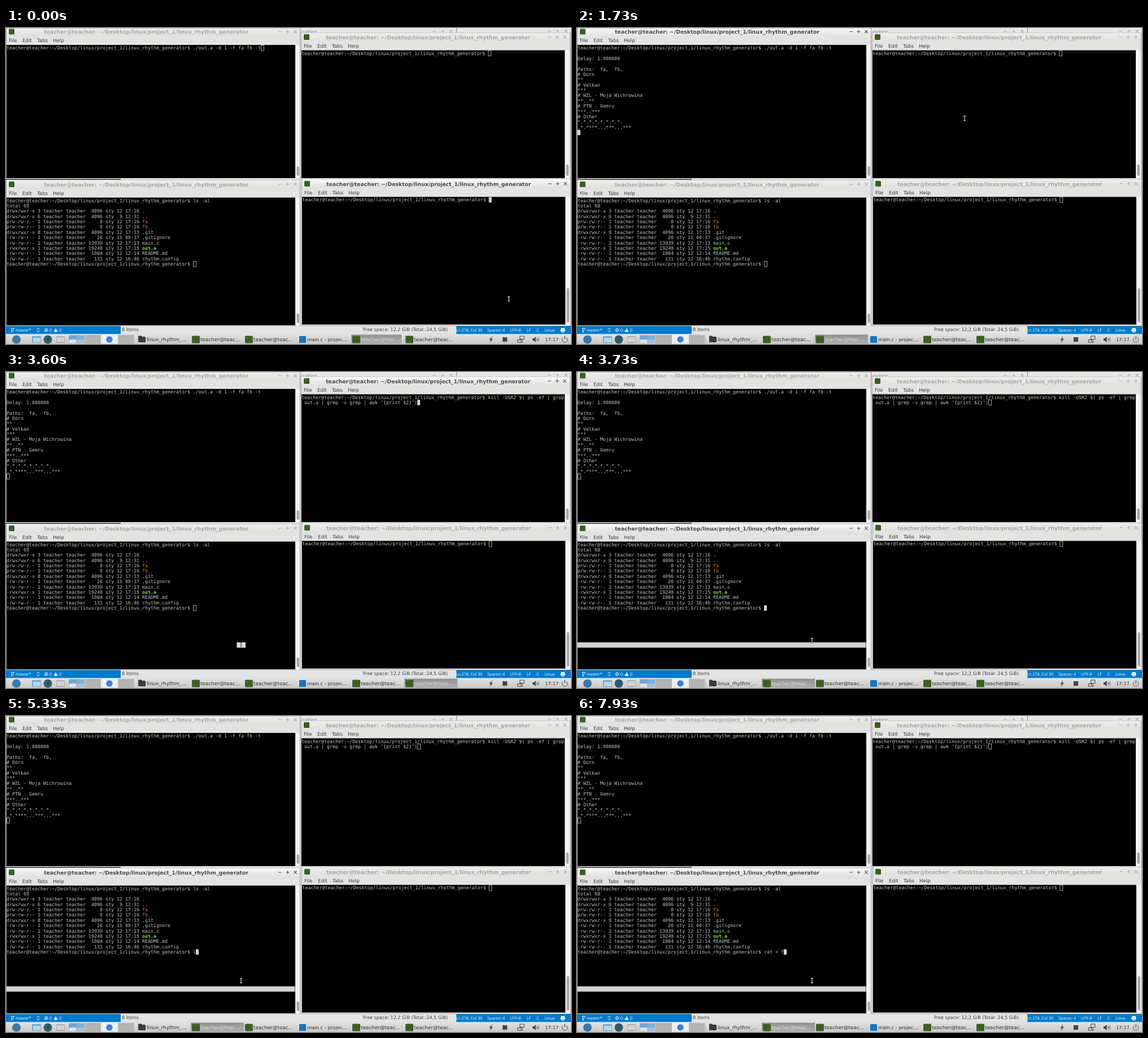
Animation of 1000x560 px, one loop 8000 ms. Source, as an HTML page with a canvas:

```html
<!DOCTYPE html>
<html lang="en">
<head>
<meta charset="utf-8">
<title>Four terminals</title>
<style>
html, body { margin: 0; width: 100%; height: 100%; overflow: hidden; background: #dededd; }
canvas { display: block; }
</style>
</head>
<body>
<canvas id="stage" width="1000" height="560"></canvas>
<script>
const ctx = document.getElementById('stage').getContext('2d');
const LOOP = 8000, STEP = 1000 / 15;
const CW = 5, LH = 9.375;
const SANS = '"DejaVu Sans", sans-serif';
const MONO = '8.33px "DejaVu Sans Mono", monospace';
const UI = '8.6px ' + SANS;
const TASK = '8.8px ' + SANS;
const BOLD = 'bold 9.375px ' + SANS;
const STATUS = '7.2px "Open Sans", sans-serif';
const FG = '#c4c4c4', GREEN = '#3c5f25', BLUE = '#007acc';

const USER = 'teacher';
const DIR = '~/Desktop/linux/project_1/linux_rhythm_generator';
const PROMPT = `${USER}@${USER}:${DIR}$ `;
const TITLE = `${USER}@${USER}: ${DIR}`;
const RUN = PROMPT + './out.a -d 1 -f fa fb -t';
const OUTPUT = ['', 'Delay: 1.000000', '', 'Paths:  fa,  fb,', '# Dorn', '**', '# Velkan', '***',
  '# WZL - Moja Wichrowina', '**..**', '# PTN - Gemru', '***..***', '# Other',
  '*.*.*.*.*.*.*.*.', '.*.****...***...***'];
const KILL = ['kill -USR2 $( ps -ef | grep', " out.a | grep -v grep | awk '{print $2}')"];

const FILES = [
  ['drwxrwxr-x 3', 4096, '12 17:16', '.', '#a9bfdc'],
  ['drwxrwxr-x 6', 4096, ' 9 12:31', '..', '#a9bfdc'],
  ['prw-rw-r-- 1', 0, '12 17:16', 'fa', '#bd8a18'],
  ['prw-rw-r-- 1', 0, '12 17:16', 'fb', '#bd7a20'],
  ['drwxrwxr-x 8', 4096, '12 17:13', '.git', '#a9bfdc'],
  ['-rw-rw-r-- 1', 26, '11 00:37', '.gitignore'],
  ['-rw-rw-r-- 1', 13939, '12 17:13', 'main.c'],
  ['-rwxrwxr-x 1', 19248, '12 17:15', 'out.a', '#8fe03c'],
  ['-rw-rw-r-- 1', 1004, '12 12:14', 'README.md'],
  ['-rw-rw-r-- 1', 131, '12 16:46', 'rhythm.config']
];

// x, y: frame corner; tx, ty: first text cell; ends of the black area; scrollbar thumb
const WINDOWS = {
  tl: { x: 0, y: 0, r: 521, b: 267, title: 6.5, bx: 485, tx: 1, ty: 30.5, br: 512, bb: 266, thumb: [245, 262], task: 422 },
  tr: { x: 522, y: 8, r: 999, b: 267, title: 16, bx: 962, tx: 523, ty: 40, br: 989, bb: 266, thumb: [242, 262], task: 706 },
  bl: { x: 0, y: 269, r: 521, b: 528, title: 277, bx: 485, tx: 1, ty: 301, br: 512, bb: 527, thumb: [506, 523], task: 328 },
  br: { x: 523, y: 267, r: 1000, b: 527, title: 276, bx: 963, tx: 524.5, ty: 299.8, br: 990, bb: 525.5, thumb: [461, 522], task: 612 }
};

const MOUSE = [[0, 890, 480], [200, 455, 168], [1467, 455, 168], [1733, 686, 160], [1867, 692, 153],
  [2733, 692, 153], [2867, 712, 151], [3333, 712, 151], [3533, 416, 484], [3667, 416, 484], [3800, 416, 469]];

// [time, value] lists: the last entry already reached holds
const FOCUS = [[0, 'br'], [195, 'tl'], [1930, 'tr'], [3730, 'bl']];
const TR_INPUT = [[0, ['']], [2265, ['clear']], [3130, KILL]];
const LS = 'ls -al', CAT = 'cat < f';
const BL_INPUT = [[0, ''], [4130, LS]]
  .concat([5000, 5067, 5133, 5200, 5267, 5400].map((t, i) => [t, LS.slice(0, 5 - i)]))
  .concat([6730, 6865, 7000, 7200, 7400, 7865, 7930].map((t, i) => [t, CAT.slice(0, i + 1)]));

const at = (list, t) => list.filter(e => e[0] <= t).pop()[1];

function rect(x, y, w, h, color) {
  ctx.fillStyle = color;
  ctx.fillRect(x, y, w, h);
}

function shade(x, y, w, h, top, bottom) {
  const g = ctx.createLinearGradient(0, y, 0, y + h);
  g.addColorStop(0, top);
  g.addColorStop(1, bottom);
  rect(x, y, w, h, g);
}

function disc(x, y, r, color) {
  ctx.fillStyle = color;
  ctx.beginPath();
  ctx.arc(x, y, r, 0, 7);
  ctx.fill();
}

function round(x, y, w, h, r, color) {
  ctx.fillStyle = color;
  ctx.beginPath();
  ctx.roundRect(x, y, w, h, r);
  ctx.fill();
}

function line(color, width, ...paths) {
  ctx.strokeStyle = color;
  ctx.lineWidth = width;
  ctx.beginPath();
  for (const p of paths)
    for (let i = 0; i < p.length; i += 2) ctx[i ? 'lineTo' : 'moveTo'](p[i], p[i + 1]);
  ctx.stroke();
}

function ring(x, y, r, color, from = 0, to = 7) {
  ctx.strokeStyle = color;
  ctx.lineWidth = 0.9;
  ctx.beginPath();
  ctx.arc(x, y, r, from, to);
  ctx.stroke();
}

function text(s, x, y, font, color, align = 'left') {
  ctx.font = font;
  ctx.fillStyle = color;
  ctx.textAlign = align;
  ctx.fillText(s, x, y);
}

function cells(w, row, s, col = 0, color = FG, weight = '') {
  ctx.font = weight + MONO;
  ctx.fillStyle = color;
  ctx.textAlign = 'left';
  [...s].forEach((c, i) => {
    if (c !== ' ') ctx.fillText(c, w.tx + (col + i) * CW, w.ty + row * LH + 7.5);
  });
}

function caret(w, row, col, solid) {
  const x = w.tx + col * CW, y = w.ty + row * LH;
  if (solid) return rect(x, y, CW, LH, '#d6d6d6');
  ctx.strokeStyle = '#c8c8c8';
  ctx.lineWidth = 0.8;
  ctx.strokeRect(x + 0.4, y + 0.1, CW, LH);
}

function buttons(x, y, color, gap = 13.5) {
  const c = x + 2 * gap;
  line(color, 1.2, [x - 3, y, x + 3, y], [x + gap - 3, y, x + gap + 3, y], [x + gap, y - 3, x + gap, y + 3],
    [c - 2.6, y - 2.6, c + 2.6, y + 2.6], [c + 2.6, y - 2.6, c - 2.6, y + 2.6]);
}

function frame(w, active) {
  const top = w.ty - 0.5, ink = active ? '#4b4b4b' : '#aaaaa8';
  rect(w.x, w.y, w.r - w.x, w.b - w.y, '#e3e3e2');
  shade(w.x, w.y, w.r - w.x, 15, active ? '#fafafa' : '#eeeeed', active ? '#e2e2e1' : '#e0e0df');
  rect(w.x, w.y, 0.8, w.b - w.y, '#9a9a9a');
  rect(w.x, w.y, w.r - w.x, 0.6, '#b5b5b5');
  round(w.x + 5, w.title - 5, 10, 10, 1.5, GREEN);
  text(TITLE, w.x + (w.x === 523 ? 225 : w.x ? 225 : 248), w.title + 3.5, BOLD, ink, 'center');
  buttons(w.bx, w.title, ink);
  ['File', 'Edit', 'Tabs', 'Help'].forEach((s, i) =>
    text(s, w.x + 5 + [0, 24, 50, 78][i], w.title + 18.8, UI, '#3a3a3a'));
  rect(w.x + 1, top, w.br - w.x - 1, w.bb - top, '#000');
  rect(w.br, top, w.r - w.br - 1, w.bb - top, '#f3f3f3');
  round(w.br + 2.3, w.thumb[0], 4.6, w.thumb[1] - w.thumb[0], 2.3, '#a9a9ac');
  rect(w.r - 1, w.y, 0.8, w.b - w.y, '#8c8c8c');
}

function backdrop() {
  rect(0, 0, 1000, 560, '#dededd');
  ctx.save();
  ctx.beginPath();
  ctx.rect(522, 0, 478, 8);
  ctx.clip();
  shade(522, 0, 478, 9, '#ececeb', '#e2e2e1');
  text('linux_rhythm_generator', 550, 9.5, BOLD, '#b0b0ae', 'right');
  buttons(758, 6, '#b0b0ae', 15);
  buttons(962, 5.5, '#b0b0ae', 14.5);
  rect(797, 0, 1, 8, '#8a8a8a');
  ctx.restore();
}

function statusBar() {
  rect(0, 528, 1000, 15, BLUE);
  rect(203, 527.5, 594, 15, '#e4e4e3');
  rect(203, 527.5, 594, 0.7, '#a8a8a8');
  text('8 items', 205, 537, '8.02px ' + SANS, '#3c3c3c');
  text('Free space: 12,2 GiB (Total: 24,5 GiB)', 632, 537, '8.02px ' + SANS, '#3c3c3c');
  const W = '#fff';
  line(W, 0.8, [10.5, 533, 10.5, 538], [13.5, 533.5, 13.5, 535, 10.5, 537]);
  for (const [x, y] of [[10.5, 532.5], [13.5, 532.5], [10.5, 538.5]]) disc(x, y, 1.1, W);
  text('master*', 17, 538, STATUS, W);
  ring(57, 535.5, 2.8, W, 0.3, 2.8);
  ring(57, 535.5, 2.8, W, 3.5, 5.9);
  ring(71, 535.5, 2.8, W);
  line(W, 0.8, [69.8, 534.3, 72.2, 536.7], [72.2, 534.3, 69.8, 536.7]);
  text('0', 77, 538, STATUS, W);
  ctx.fillStyle = W;
  ctx.beginPath();
  ctx.moveTo(88, 532);
  ctx.lineTo(91.5, 538.5);
  ctx.lineTo(84.5, 538.5);
  ctx.fill();
  rect(87.6, 534, 0.8, 2.4, BLUE);
  text('0', 94, 538, STATUS, W);
  ctx.save();
  ctx.beginPath();
  ctx.rect(797, 528, 203, 15);
  ctx.clip();
  text('Ln 278, Col 30', 843, 538, STATUS, W, 'right');
  ctx.restore();
  [['Spaces: 4', 852], ['UTF-8', 892], ['LF', 921.5], ['C', 939], ['Linux', 953]]
    .forEach(([s, x]) => text(s, x, 538, STATUS, W));
  disc(985.5, 535.5, 4, W);
  disc(984, 534.5, 0.6, BLUE);
  disc(987, 534.5, 0.6, BLUE);
  ring(985.5, 535.8, 2, BLUE, 0.3, 2.8);
}

function taskBar(focus) {
  shade(0, 542.5, 1000, 17.5, '#e2e2e1', '#c9c9c8');
  rect(0, 542.5, 1000, 0.7, '#f4f4f4');
  disc(18.5, 552, 7.5, '#3978a8');
  round(46, 546, 16, 12, 1.5, '#76a9cf');
  rect(48, 549, 13, 8, '#b9d4e8');
  disc(74, 552, 7.5, '#2d5a6b');
  round(89, 546, 15, 12, 1, '#a9adab');
  rect(90, 548, 13, 8, '#d3d5d3');

  rect(111, 544.5, 28, 14.5, '#c2ccd4');
  rect(111, 544.5, 13.5, 6.5, '#6fa6d2');
  rect(125.5, 544.5, 13, 6.5, '#80b1d8');
  rect(112, 552.5, 12, 6, '#dde5eb');
  rect(125.5, 552.5, 13, 6, '#9fc3df');
  line('#8197a8', 0.8, [111, 551.7, 139, 551.7], [125, 544.5, 125, 559]);
  rect(139.5, 544, 28.5, 15.5, '#b4b4b3');
  rect(168, 544, 30, 15.5, '#f0f0f0');
  rect(198, 544, 28.5, 15.5, '#b4b4b3');
  disc(183, 552, 5.8, '#3f7fd8');

  round(234, 547, 13, 10, 1.2, '#3b3b39');
  rect(234, 545.5, 6, 3, '#3b3b39');
  text('linux_rhythm_...', 249, 555, TASK, '#333');
  for (const [id, w] of Object.entries(WINDOWS)) {
    const on = id === focus;
    if (on) shade(w.task - 1, 543.5, w.task === 612 ? 89 : 94, 16, '#929291', '#adadac');
    round(w.task + 1, 545.5, 14, 13, 1.5, GREEN);
    text(USER + '@teac...', w.task + 16, 555, TASK, on ? '#dededd' : '#333');
  }
  round(519, 546, 12, 12, 1, '#1974ba');
  text('main.c - projec...', 533, 555, '8.4px ' + SANS, '#333');

  const K = '#444';
  ctx.fillStyle = K;
  ctx.beginPath();
  [[861, 546], [855, 553], [858, 552.7], [856, 558], [862, 551], [859, 551.2]].forEach(p => ctx.lineTo(...p));
  ctx.fill();
  rect(879, 548, 8, 8, K);
  ctx.strokeStyle = K;
  ctx.lineWidth = 1;
  ctx.strokeRect(909.5, 546, 7.5, 5.5);
  ctx.strokeRect(905.5, 552.5, 6, 4.5);
  line(K, 1, [914, 552, 914, 557, 911, 557]);
  rect(932, 550, 3, 4, K);
  ctx.beginPath();
  [[934, 550], [937.5, 547], [937.5, 557], [934, 554]].forEach(p => ctx.lineTo(...p));
  ctx.fill();
  for (const r of [2, 4, 6]) ring(937.5, 552, r, r > 5 ? '#8a8a8a' : K, -0.8, 0.8);
  text('17:17', 954, 555, '8.33px ' + SANS, '#333');
  ring(989, 552.3, 4.8, K, -1, 4.14);
  line(K, 1.1, [989, 546, 989, 552]);
}

function topLeft(w, t, active) {
  cells(w, 0, RUN);
  const done = t >= 1065;
  if (done) OUTPUT.forEach((s, i) => cells(w, i + 1, s));
  caret(w, done ? 16 : 0, done ? 0 : RUN.length, active);
}

function topRight(w, t, active) {
  const [a, b] = at(TR_INPUT, t);
  cells(w, 0, PROMPT + a);
  if (b) cells(w, 1, b);
  caret(w, b ? 1 : 0, b ? b.length : PROMPT.length + a.length, active);
}

function bottomLeft(w, t, active) {
  cells(w, 0, PROMPT + LS);
  cells(w, 1, 'total 60');
  FILES.forEach(([mode, size, date, name, color], i) => {
    cells(w, i + 2, `${mode} ${USER} ${USER} ${String(size).padStart(5)} sty ${date} `);
    cells(w, i + 2, name, 48, color, name === 'out.a' ? 'bold ' : '');
  });
  const input = PROMPT + at(BL_INPUT, t);
  cells(w, 12, input);
  caret(w, 12, input.length, active);
  const y = w.ty + 19 * LH;
  if (t >= 3660) rect(1, y, 510.5, LH, '#d2d2d2');
  else if (t >= 3530) rect(408.5, y, 15.5, LH, '#e0e0e0');
}

function bottomRight(w, t, active) {
  cells(w, 0, PROMPT);
  caret(w, 0, PROMPT.length, active);
}

function pointer(t) {
  let i = 0;
  while (i < MOUSE.length - 2 && MOUSE[i + 1][0] <= t) i++;
  const [t0, x0, y0] = MOUSE[i], [t1, x1, y1] = MOUSE[i + 1];
  let p = Math.min(1, (t - t0) / (t1 - t0));
  p = p * p * (3 - 2 * p);
  const x = Math.round(x0 + (x1 - x0) * p), y = Math.round(y0 + (y1 - y0) * p);
  const beam = [[x - 2, y - 4, x + 2, y - 4], [x - 2, y + 4, x + 2, y + 4], [x, y - 4, x, y + 4]];
  line('#222', 2.2, ...beam);
  line('#e4e4e4', 1, ...beam);
}

const CONTENT = { tl: topLeft, tr: topRight, bl: bottomLeft, br: bottomRight };

function draw(ms) {
  const t = Math.floor((ms + 4) / STEP) * STEP + 1;
  const focus = at(FOCUS, t);
  ctx.textRendering = 'geometricPrecision';
  backdrop();
  statusBar();
  for (const id in WINDOWS) {
    frame(WINDOWS[id], id === focus);
    CONTENT[id](WINDOWS[id], t, id === focus);
  }
  rect(0, 267.3, 203, 1.4, '#2a2a2a');
  taskBar(focus);
  pointer(t);
}

const start = performance.now();
function tick() {
  draw((performance.now() - start) % LOOP);
  requestAnimationFrame(tick);
}
tick();
</script>
</body>
</html>
```
